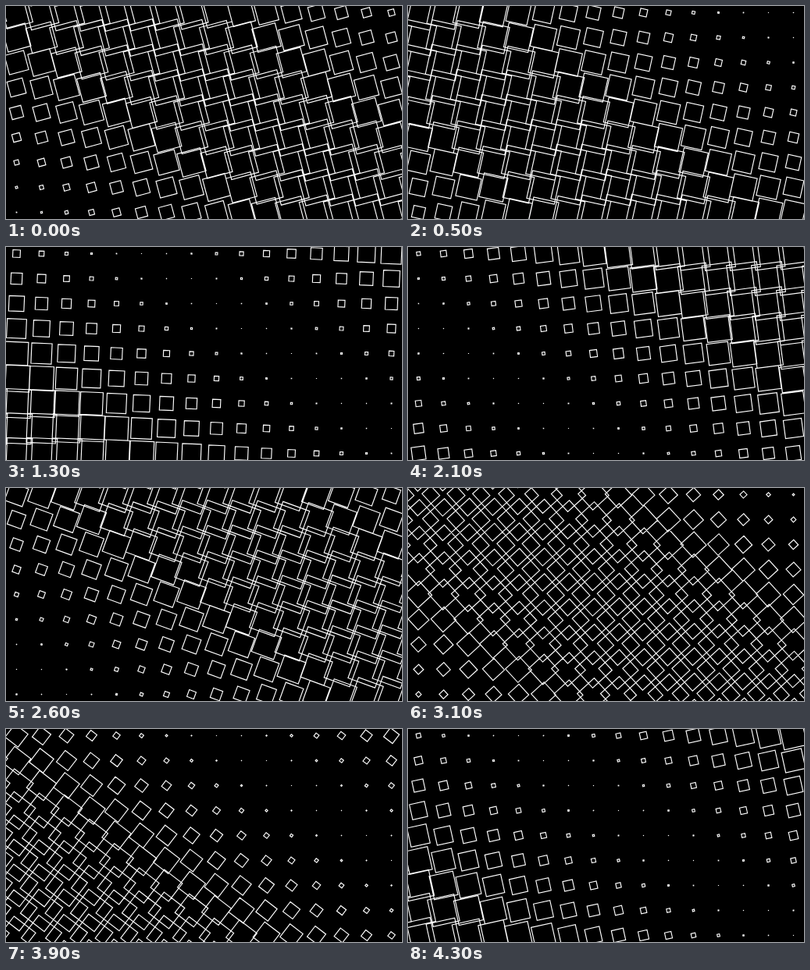
Write an HTML page that moves like this. It is 507 px wide and 273 px high and loops after 4400 ms.

```html
<!DOCTYPE html>
<html lang="en">
<head>
<meta charset="utf-8">
<title>Turning squares</title>
<style>
html, body { margin: 0; width: 100%; height: 100%; overflow: hidden; background: #000; }
svg { display: block; width: 100%; height: 100%; }
path { fill: none; stroke: #fff; stroke-width: 1.15; }
</style>
</head>
<body>
<svg viewBox="0 0 507 273"><path id="grid"/></svg>
<script>
const LOOP = 4400, STEP = 100, GAP = 32, MAX = 39;
const COLS = 16, ROWS = 9, SPEED = 125; // degrees per second
const X0 = (507 - GAP * (COLS - 1)) / 2, Y0 = (273 - GAP * (ROWS - 1)) / 2;
const rad = deg => deg * Math.PI / 180;
const grid = document.getElementById('grid');

// Closed square of half-diagonal vector (dx, dy) around (x, y)
function square(x, y, dx, dy) {
  const p = (a, b) => (x + a).toFixed(2) + ' ' + (y + b).toFixed(2);
  return 'M' + p(dx, dy) + 'L' + p(-dy, dx) + 'L' + p(-dx, -dy) + 'L' + p(dy, -dx) + 'Z';
}

function draw(ms) {
  const swing = SPEED * Math.floor(ms % LOOP / STEP) * STEP / 1000;
  const turn = rad(30 - swing);
  const cos = Math.cos(turn), sin = Math.sin(turn);
  let d = '';
  for (let j = -1; j <= ROWS; j++) {
    for (let i = -1; i <= COLS; i++) {
      const phase = rad(11.25 * i - 15.47 * j - 221.6 + swing);
      const side = MAX / 2 * (1 - Math.cos(phase)) + 0.03;
      const r = side / Math.SQRT2;
      d += square(X0 + GAP * i, Y0 + GAP * j, r * cos, r * sin);
    }
  }
  grid.setAttribute('d', d);
}

const start = performance.now();
function tick() {
  draw(performance.now() - start);
  requestAnimationFrame(tick);
}
draw(0);
requestAnimationFrame(tick);
</script>
</body>
</html>
```
